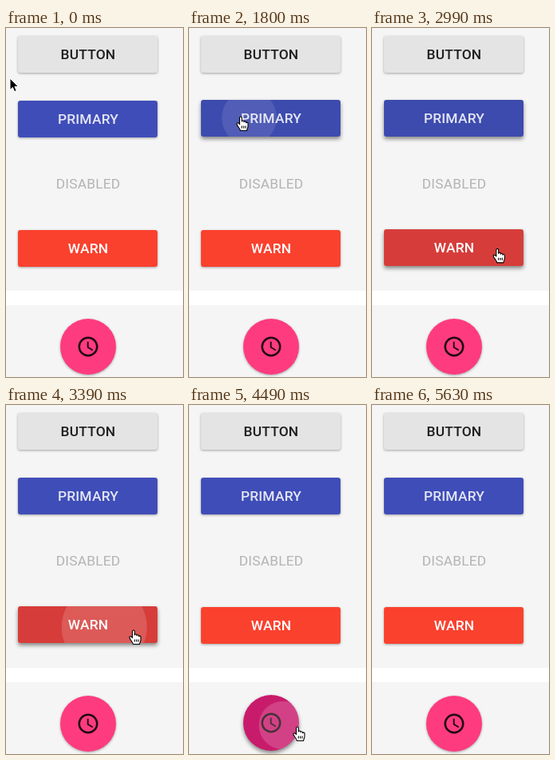
Recreate the animation shown at these times as an HTML page. Size 222 by 437 pixels, loop 5.91 s.

```html
<!DOCTYPE html>
<html lang="en">
<head>
<meta charset="utf-8">
<title>Button ripples</title>
<style>
  html, body { margin: 0; width: 100%; height: 100%; overflow: hidden; background: #f5f5f5; }
  svg { display: block; width: 222px; height: 437px; }
  text { font: 500 17.4px Roboto, Arial, sans-serif; text-anchor: middle; letter-spacing: .01em; }
  .hand path { stroke: #000; stroke-width: 1.1; stroke-linejoin: round; }
</style>
</head>
<body>
<svg viewBox="0 0 222 437">
  <defs>
    <clipPath id="box"><rect x="15" width="175" height="46" rx="3"/></clipPath>
    <clipPath id="disc"><circle cx="103" cy="35" r="35"/></clipPath>
  </defs>
  <rect width="222" height="437" fill="#f5f5f5"/>
  <rect y="329" width="222" height="18" fill="#fff"/>
  <text x="103" y="201" fill="#b4b4b4" style="font-weight:400">DISABLED</text>

  <g id="plain">
    <rect class="face" x="15" width="175" height="46" rx="3"/>
    <text x="103" y="29" fill="#1f1f1f">BUTTON</text>
    <g clip-path="url(#box)"><circle class="wave"/></g>
  </g>
  <g id="primary">
    <rect class="face" x="15" width="175" height="46" rx="3"/>
    <g clip-path="url(#box)"><circle id="focus" cx="102.5" cy="23" r="71"/></g>
    <text x="103" y="29" fill="#e4e6f4">PRIMARY</text>
    <g clip-path="url(#box)"><circle class="wave"/></g>
  </g>
  <g id="warn">
    <rect class="face" x="15" width="175" height="46" rx="3"/>
    <text x="103" y="29" fill="#fff">WARN</text>
    <g clip-path="url(#box)"><circle class="wave"/></g>
  </g>
  <g id="fab">
    <circle class="face" cx="103" cy="35" r="35"/>
    <g class="icon" transform="translate(88 20) scale(1.25)">
      <circle cx="12" cy="12" r="9" fill="none" stroke="#1f0a13" stroke-width="2"/>
      <path d="M12.5 7H11v6l5.25 3.15.75-1.23-4.5-2.67z" fill="#1f0a13"/>
    </g>
    <g clip-path="url(#disc)"><circle class="wave"/></g>
  </g>

  <g id="cursor">
    <path class="arrow" d="M0 0V14.5L3.3 11.4 5.6 16.6 8.2 15.5 5.9 10.4H10.4Z" fill="#000" stroke="#fff"/>
    <g class="hand">
      <path fill="#fff" d="M-1.5 9V1.5C-1.5-.5 1.3-.5 1.3 1.5V6C1.3 4.6 4 4.6 4 6V6.8C4 5.6 6.6 5.7 6.6 7V7.8C6.6 6.8 9 6.9 9 8.3V12C9 14 7.8 15 7.6 17.5H-.6C-.8 15.5-2.6 14-3.8 11.8-5 9.8-5.8 8.8-4.8 8.1-3.8 7.4-2.3 8.3-1.5 9.6Z"/>
      <path fill="none" d="M1.3 11.5v3M3.7 11.5v3M6 11.5v3"/>
    </g>
    <g class="ban" fill="#eee" stroke="#8b8b8b" stroke-width="2.4">
      <circle cx="9" cy="23" r="7.6"/>
      <path d="M3.8 17.8L14.2 28.2"/>
    </g>
  </g>
</svg>
<script>
const LOOP = 5910;
const $ = (sel, root = document) => root.querySelector(sel);
const clamp = v => Math.min(1, Math.max(0, v));
const mix = (a, b, k) => a + (b - a) * k;
const ramp = (t, from, to) => clamp((t - from) / (to - from));
const smooth = k => k * k * (3 - 2 * k);

// on/off: [start, end] of the raise and of the return; click: [time, x, y]
const buttons = [
  { id: 'plain', y: 10, rest: [228, 228, 228], active: [207, 207, 207],
    on: [400, 520], off: [1690, 1810], click: [780, 48, 50], ink: '#000', alpha: .125 },
  { id: 'primary', y: 91, rest: [63, 77, 184], active: [61, 75, 174],
    on: [1290, 1450], off: [3250, 3385], click: [1756, 64, 112], ink: '#fff', alpha: .1 },
  { id: 'warn', y: 253, rest: [250, 65, 46], active: [214, 61, 58],
    on: [2790, 2920], off: [4370, 4485], click: [3316, 159, 283], ink: '#fff', alpha: .15 },
  { id: 'fab', y: 364, rest: [255, 59, 127], active: [201, 27, 108], round: true,
    on: [3890, 4030], off: [5350, 5580], click: [4425, 132, 404], ink: '#fff', alpha: .17 }
];
for (const b of buttons) {
  const root = $('#' + b.id);
  Object.assign(b, { root, face: $('.face', root), wave: $('.wave', root) });
  b.wave.setAttribute('fill', b.ink);
}

// time, x, y of the pointer tip
const path = [
  [0, 5, 63], [240, 5, 63], [520, 48, 49], [1000, 48, 49], [1270, 64, 122],
  [1450, 65, 111], [2200, 65, 111], [2530, 65, 190], [2760, 146, 252],
  [3080, 160, 282], [3600, 160, 282], [3800, 177, 330], [4090, 136, 403],
  [4800, 136, 403], [5290, 171, 415], [5520, 182, 446], [LOOP, 182, 446]
];
const cursor = $('#cursor');
const shapes = { arrow: $('.arrow'), hand: $('.hand'), ban: $('.ban') };

function pointerAt(t) {
  const i = path.findIndex(p => p[0] > t);
  const [t0, x0, y0] = path[i - 1], [t1, x1, y1] = path[i];
  const k = smooth(ramp(t, t0, t1));
  return [mix(x0, x1, k), mix(y0, y1, k)];
}

const inBox = (x, y, top) => x > 15 && x < 190 && y >= top - 1 && y < top + 46;
const over = (b, x, y) => b.round ? Math.hypot(x - 103, y - 399) < 35 : inBox(x, y, b.y);

function drawCursor(t) {
  const [x, y] = pointerAt(t);
  const hand = buttons.some(b => over(b, x, y));
  const ban = inBox(x, y, 172);
  cursor.setAttribute('transform', `translate(${x} ${y})`);
  shapes.hand.style.display = hand ? '' : 'none';
  shapes.arrow.style.display = hand ? 'none' : '';
  shapes.ban.style.display = ban ? '' : 'none';
}

// The wave grows exponentially and drifts from the click to the centre.
function drawWave(b, t, top) {
  const [start, cx, cy] = b.click;
  const age = Math.max(0, t - start) / 1000;
  const size = b.round ? 114 : 170;
  const r = size * (1 - 80 ** (-age / (b.round ? .95 : .87)));
  const drift = clamp((r / (b.round ? 45 : 70)) ** 1.7);
  const mid = b.round ? [103, 35] : [102.5, 23];
  b.wave.setAttribute('r', r);
  b.wave.setAttribute('cx', mix(cx, mid[0], drift));
  b.wave.setAttribute('cy', mix(cy - top, mid[1], drift));
  b.wave.setAttribute('opacity', b.alpha * (1 - ramp(age, .1, .36)));
}

function drawButton(b, t) {
  const k = smooth(ramp(t, ...b.on)) - smooth(ramp(t, ...b.off));
  const top = b.y - k;
  const rgb = b.rest.map((c, i) => Math.round(mix(c, b.active[i], k)));
  b.root.setAttribute('transform', `translate(0 ${top})`);
  b.face.setAttribute('fill', `rgb(${rgb})`);
  b.face.style.filter =
    `drop-shadow(0 ${mix(1.5, 3.5, k)}px ${mix(1.4, 2.5, k)}px rgba(0,0,0,${mix(.34, .45, k)}))`;
  drawWave(b, t, top);
}

const start = performance.now();
function draw() {
  const t = (performance.now() - start) % LOOP;
  for (const b of buttons) drawButton(b, t);
  $('#focus').setAttribute('opacity', .03 * (ramp(t, 2200, 2400) - ramp(t, 2760, 2900)));
  drawCursor(t);
  requestAnimationFrame(draw);
}
draw();
</script>
</body>
</html>
```
